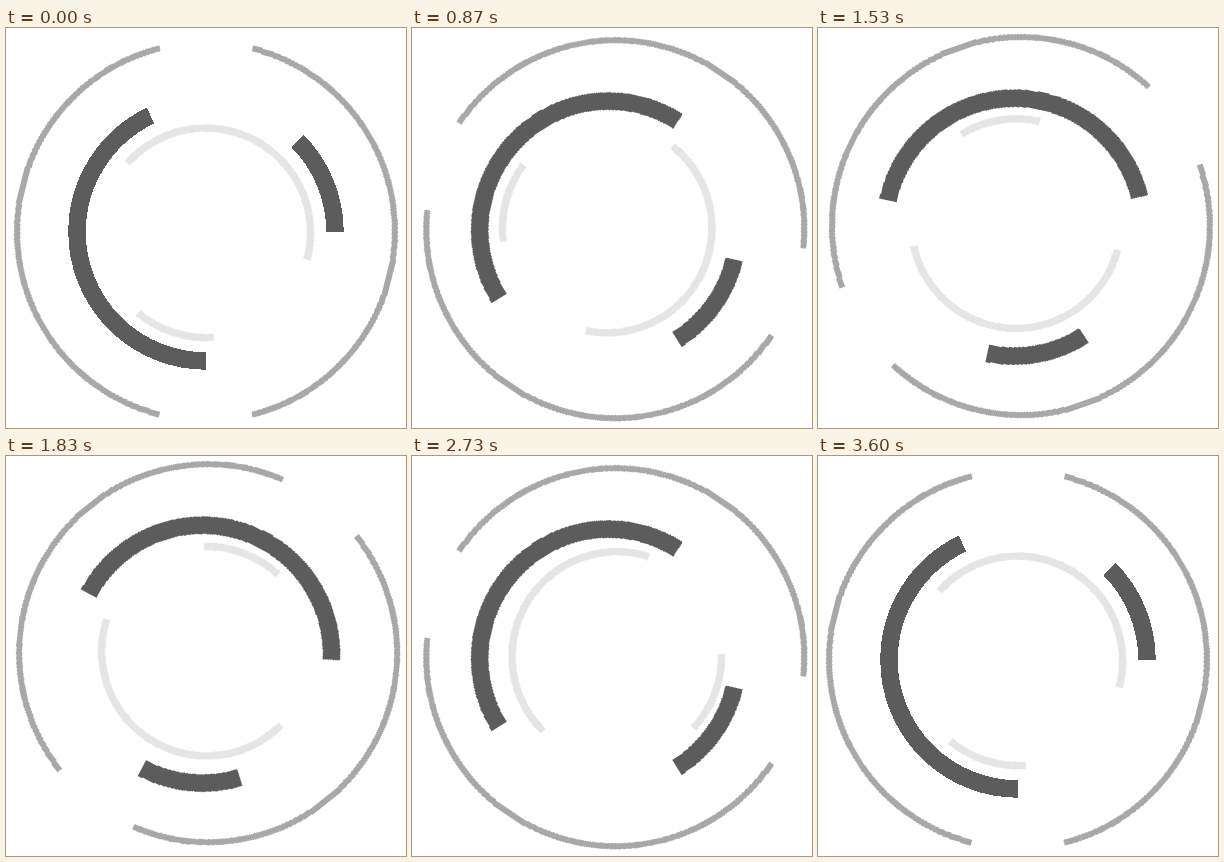
These frames come from a looping animation (400 by 400 pixels, 3.63 s). An HTML page:

```html
<!DOCTYPE html>
<html lang="en">
<head>
<meta charset="utf-8">
<title>Rotating rings</title>
<style>
  html, body {
    margin: 0;
    width: 100%;
    height: 100%;
    overflow: hidden;
    background: #fff;
  }
  svg {
    display: block;
    width: 100vw;
    height: 100vh;
  }
  circle {
    fill: none;
    shape-rendering: crispEdges;
  }
  /* Each ring sits slightly off the pivot, so it wobbles as it turns. */
  g {
    transform-origin: 200px 200px;
    animation: swing 3630ms steps(60) infinite;
  }
  .outer { --turn: -145deg; stroke: #a8a8a8; stroke-width: 6; }
  .middle { --turn: 120deg; stroke: #5c5c5c; stroke-width: 17.5; }
  .inner {
    stroke: #e5e5e5;
    stroke-width: 7.5;
    animation-name: spin;
    animation-timing-function: steps(120);
  }
  /* 1800 ms out, 1800 ms back, then a 30 ms hold */
  @keyframes swing {
    0% { transform: rotate(0deg); }
    49.5868% { transform: rotate(var(--turn)); }
    99.1736%, 100% { transform: rotate(0deg); }
  }
  @keyframes spin {
    0% { transform: rotate(0deg); }
    99.1736%, 100% { transform: rotate(360deg); }
  }
</style>
</head>
<body>
<svg viewBox="0 0 400 400">
  <g class="outer">
    <circle cx="200" cy="203.5" r="189" pathLength="360"
            stroke-dasharray="151.8 28.2" transform="rotate(-75.9 200 203.5)"/>
  </g>
  <g class="middle">
    <circle cx="200" cy="204" r="129" pathLength="360"
            stroke-dasharray="154.5 70.5 45 90" transform="rotate(90 200 204)"/>
  </g>
  <g class="inner">
    <circle cx="199.7" cy="204.8" r="104.8" pathLength="360"
            stroke-dasharray="153.2 70.9 44.4 91.5" transform="rotate(221.5 199.7 204.8)"/>
  </g>
</svg>
</body>
</html>
```
